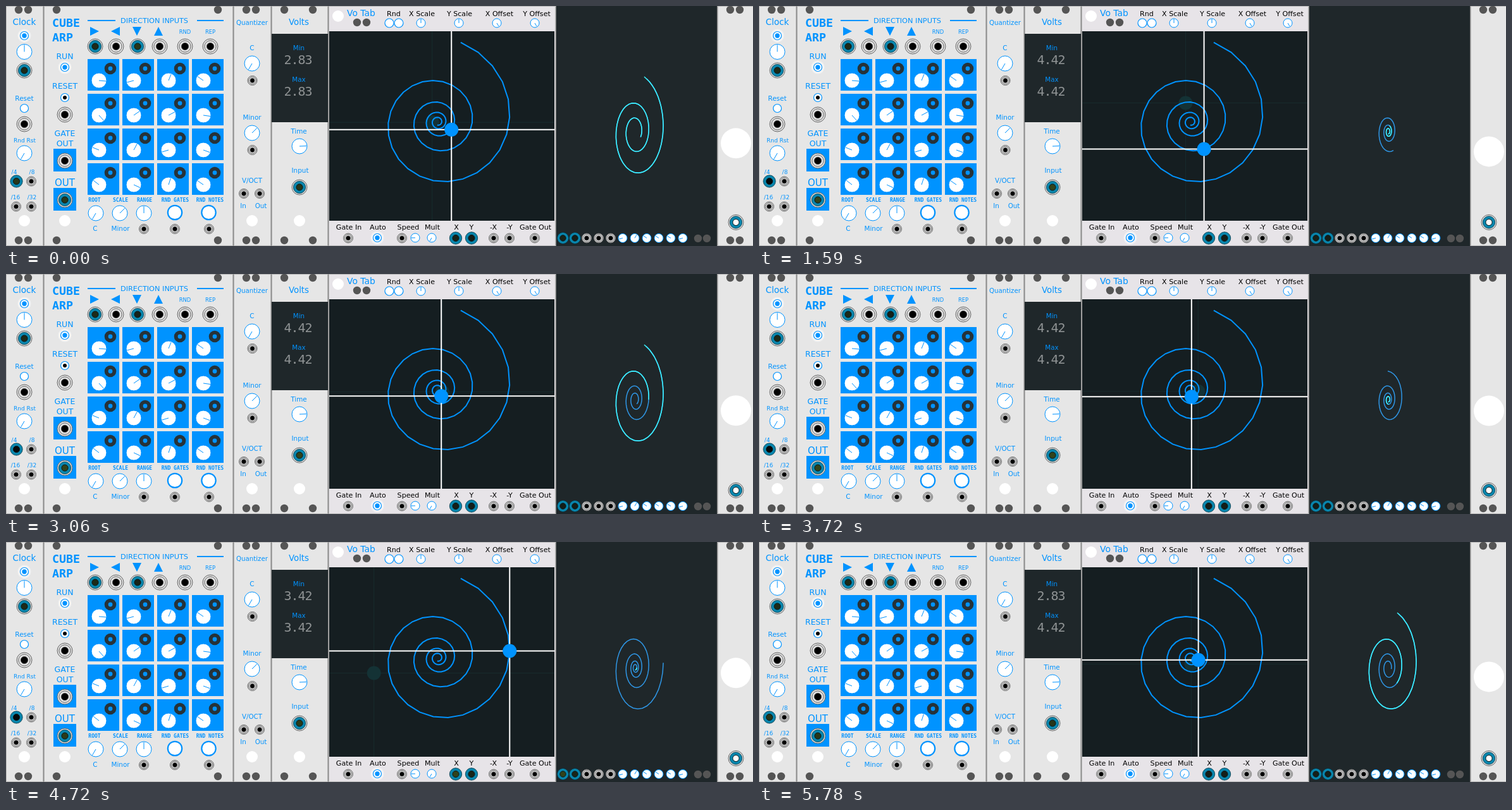
Write an HTML page that moves like this. It is 1181 px wide and 380 px high and loops after 5880 ms.

```html
<!DOCTYPE html>
<html lang="en">
<head>
<meta charset="utf-8">
<title>Modular rack</title>
<style>
html, body { margin: 0; width: 100%; height: 100%; overflow: hidden; background: #e6e6e6; }
svg { display: block; width: 1181px; height: 380px; }
text { font-family: "DejaVu Sans", sans-serif; }
.mono { font-family: "DejaVu Sans Mono", monospace; }
.bold { font-weight: bold; }
</style>
</head>
<body>
<svg id="rack" viewBox="0 0 1181 380"></svg>
<script>
const BLUE = '#0093ff', TEAL = '#0986ad', DARK = '#1f272a', PAPER = '#e6e6e6';
const LOOP = 5880;
const out = [];

// ---------- drawing helpers ----------
const circle = (x, y, r, fill, extra = '') =>
  out.push(`<circle cx="${x}" cy="${y}" r="${r}" fill="${fill}" ${extra}/>`);
const rect = (x, y, w, h, fill, extra = '') =>
  out.push(`<rect x="${x}" y="${y}" width="${w}" height="${h}" fill="${fill}" ${extra}/>`);
const line = (x1, y1, x2, y2, color, w = 1, id = '') =>
  out.push(`<line id="${id}" x1="${x1}" y1="${y1}" x2="${x2}" y2="${y2}" stroke="${color}" stroke-width="${w}"/>`);
const label = (s, x, y, size, color = BLUE, extra = 'text-anchor="middle"') =>
  out.push(`<text x="${x}" y="${y}" font-size="${size}" fill="${color}" ${extra}>${s}</text>`);
const ringed = (w, color = BLUE) => `stroke="${color}" stroke-width="${w}"`;

function knob(x, y, deg, r = 12) {
  const a = deg * Math.PI / 180;
  circle(x, y, r, '#fff', ringed(1));
  line(x, y, x + (r - 1) * Math.cos(a), y + (r - 1) * Math.sin(a), BLUE);
}
function port(x, y, r = 12) {
  circle(x, y, r, '#dedede', ringed(1, '#666'));
  circle(x, y, r * .76, '#e2e2e2', ringed(1, '#666'));
  circle(x, y, r * .47, '#000', ringed(.8, '#444'));
}
function plug(x, y, id, core = '#1b2a1c') {
  circle(x, y, 12, '#dedede', ringed(1, '#666'));
  jack(x, y, id, 9.7, core);
}
function jack(x, y, id, r = 9.7, core = '#1b2a1c') {
  circle(x, y, r, TEAL, ringed(.8, '#0a3442'));
  circle(x, y, r * .52, core, `id="${id}" ${ringed(1, '#0c1518')}`);
}
function button(x, y, r = 6.5, w = 1.2) { circle(x, y, r, '#fff', ringed(w)); }
function led(x, y) {
  circle(x, y, 10.5, '#fff', 'opacity=".5"');
  button(x, y);
  circle(x, y, 3.7, BLUE);
}
const screws = (...pts) => pts.forEach(([x, y]) => circle(x, y, 6.2, '#555'));
const corners = (a, b) => screws([a, 6], [b, 6], [a, 371], [b, 371]);
const badge = (x, y) => circle(x, y, 9, '#fff');
function panel(x, w, fill = PAPER, edge = '#b4b4b4') {
  rect(x + .5, .5, w - 1, 379, fill, ringed(1, edge));
}

// ---------- panels ----------
panel(0, 59); panel(60, 299); panel(360, 59); panel(420, 89);
panel(510, 359, '#e7e4e8'); panel(870, 254, DARK, DARK); panel(1125, 57);
[59.5, 359.5, 419.5, 509.5, 869.5, 1124.5].forEach(x => line(x, 0, x, 380, '#8c8c8c'));

// clock
corners(20, 35);
label('Clock', 29, 30, 13.6);
led(29, 47);
knob(29, 72.5, -90);
plug(29, 102, 'clock');
label('Reset', 29, 150, 10.5);
button(29, 162);
port(29, 187);
label('Rnd Rst', 29.5, 216, 9);
knob(29, 233, 120);
label('/4', 13, 266, 9); label('/8', 41, 266, 9);
label('/16', 15, 306, 9); label('/32', 41, 306, 9);
jack(16.5, 277.5, 'quarter');
port(40, 277.5, 7.5); port(16, 317.5, 7.5); port(40, 317.5, 7.5);
badge(29, 340);

// sequencer
corners(80, 335);
label('CUBE', 73, 33, 18.3, BLUE, 'class="mono bold"');
label('ARP', 73, 56, 18.3, BLUE, 'class="mono bold"');
label('RUN', 93, 84, 12.5); led(93, 97);
label('RESET', 93, 131, 12.5); button(93, 145); circle(93, 145, 3, '#000');
port(93, 172);
label('GATE', 93, 206, 12.5); label('OUT', 93, 222, 12.5);
rect(75, 226, 36, 36, BLUE); port(93, 245);
label('OUT', 93, 285, 15);
rect(75, 288, 36, 36, BLUE); plug(93, 307, 'note');
label('DIRECTION INPUTS', 234.5, 27, 11.3);
line(129, 23, 173, 23, BLUE, 2); line(302, 23, 344, 23, BLUE, 2);
out.push(`<path fill="${BLUE}" d="M133 33L147 40L133 47ZM180 33L166 40L180 47ZM200 33H214L207 47ZM234 47H248L241 33Z"/>`);
label('RND', 283, 44, 8.4); label('REP', 323, 44, 8.4);
plug(141, 64, 'right'); port(174, 64); plug(208, 64, 'down');
port(243, 64); port(283, 64); port(323, 64);
const turns = [5, 165, -68, 215, 48, -35, -28, 8, 202, -62, 163, 20, 218, 25, -72, 215];
turns.forEach((deg, i) => {
  const x = 129 + 55 * (i % 4), y = 84 + 55 * (i >> 2);
  rect(x, y, 50, 50, BLUE);
  knob(x + 18, y + 34, deg);
  circle(x + 36, y + 15, 9.3, '#263238');
  circle(x + 36, y + 15, 3.4, BLUE, `id="cell${i}"`);
});
[['ROOT', 140], ['SCALE', 181], ['RANGE', 219], ['RND GATES', 267.5], ['RND NOTES', 322.5]]
  .forEach(([s, x]) => label(s, x, 310, 8, BLUE, 'class="mono bold" text-anchor="middle"'));
knob(142, 328, 120); knob(180, 328, -45); knob(218, 328, -90);
button(267, 327, 11.2, 2.2); button(320.5, 327, 11.2, 2.2);
label('C', 141, 356, 10.4); label('Minor', 181, 356, 10.4);
[218, 267, 321].forEach(x => port(x, 353, 7.5));
badge(93, 340);

// quantizer
corners(380, 395);
label('Quantizer', 389, 30, 10.2);
label('C', 389, 70, 10.4); knob(389, 91, 120); port(389.5, 118, 7.5);
label('Minor', 389, 180, 10.4); knob(389, 201, -45); port(389.5, 228, 7.5);
label('V/OCT', 389, 280, 10.3);
port(376, 297, 7.5); port(401, 297, 7.5);
label('In', 375, 320, 10.3); label('Out', 403, 320, 10.3);
badge(389, 340);

// volt meter
corners(440, 485);
label('Volts', 463, 30, 13.3);
rect(420, 44, 89, 140, DARK);
label('Min', 463, 70, 10.3); label('Max', 463, 120, 10.3);
const digits = id => `id="${id}" class="mono" letter-spacing="-1"`;
label('', 439.5, 92, 20, '#8f9394', digits('min'));
label('', 439.5, 142, 20, '#8f9394', digits('max'));
label('Time', 463, 202, 10.4); knob(464, 222, -2);
label('Input', 465, 264, 10.4); plug(464, 287, 'meter');
badge(464, 340);

// pad
badge(525, 16);
label('Vo Tab', 539, 16, 13.9, BLUE, '');
screws([555, 26], [570, 26]);
[['Rnd', 613], ['X Scale', 657.5], ['Y Scale', 717], ['X Offset', 780], ['Y Offset', 839]]
  .forEach(([s, x]) => label(s, x, 16, 11.1, '#000'));
button(606, 27, 7); button(621, 27, 7);
knob(656, 27, -90, 7); knob(716, 27, -90, 7); knob(776, 27, 60, 7); knob(836, 27, 60, 7);
rect(511, 40, 356, 300, '#151e21');
[['Gate In', 542], ['Auto', 588], ['Speed', 636], ['Mult', 674], ['X', 712], ['Y', 736],
 ['-X', 770.5], ['-Y', 796], ['Gate Out', 837]].forEach(([s, x]) => label(s, x, 354, 11.1, '#000'));
[541, 626, 771, 796, 836].forEach(x => port(x, 367.5, 7.5));
led(587, 367);
knob(647, 367, 180, 7); knob(673, 367, 120, 7);
jack(711, 367.5, 'px'); jack(736, 367.5, 'py');

// scope
jack(880.5, 367.5, 'sx', 9); jack(899.5, 367.5, 'sy', 9);
[918, 937, 956].forEach(x => port(x, 367.5, 7.5));
[165, -60, -145, -145, -150, 165].forEach((deg, i) => knob(975 + 19 * i, 367.5, deg, 7));
screws([1094, 368], [1108, 368]);

// bouncer
corners(1145, 1160);
plug(1154, 342.5, 'exit', '#fff');
circle(1154, 0, 24, '#fff', 'id="bouncer"');

// ---------- spiral ----------
const TURNS = 4.485;   // from the outer tip to the middle
const MEMORY = 4.58;   // length of the scope trail, in turns
const SIDES = 115;
const MID = { x: 689, y: 190 };
const HUB = { x: 682.8, y: 183.6 };

function spiral(p) {
  const r = 131 * Math.pow(.482, p), a = (p * 360 - 74) * Math.PI / 180;
  return { x: HUB.x + r * Math.cos(a), y: HUB.y + r * Math.sin(a) };
}
// back and forth between tip and middle
function fold(s) {
  const m = s % (2 * TURNS);
  return Math.abs(m) < TURNS ? Math.abs(m) : 2 * TURNS - Math.abs(m);
}
const toScope = ({ x, y }) => ({ x: 995 + .389 * (x - HUB.x), y: 199 + .691 * (y - HUB.y) });
const join = pts => pts.map(p => p.x.toFixed(2) + ' ' + p.y.toFixed(2)).join('L');

const spots = Array.from({ length: SIDES + 1 }, (_, i) => spiral(i / SIDES * TURNS));
line(511, 0, 867, 0, '#182c2e', 1, 'ghostH');
line(0, 40, 0, 340, '#182c2e', 1, 'ghostV');
circle(0, 0, 11, '#143235', 'id="ghost"');
out.push(`<path d="M${join(spots)}" fill="none" stroke="${BLUE}" stroke-width="2"/>`);
line(511, 0, 867, 0, '#fff', 2, 'crossH');
line(0, 40, 0, 340, '#fff', 2, 'crossV');
circle(0, 0, 11, BLUE, 'id="ball"');
[['trail', '#2f97e6'], ['glow', '#3df6ff']].forEach(([id, color]) =>
  out.push(`<path id="${id}" fill="none" stroke="${color}" stroke-width="1.5"/>`));

document.getElementById('rack').innerHTML = out.join('');
const $ = id => document.getElementById(id);
const set = (id, attrs) => { for (const k in attrs) $(id).setAttribute(k, attrs[k]); };

// ---------- timing ----------
// [start, equal steps until the next start]
const pace = [[0, 1], [60, 5], [610, 1], [730, 3], [1070, 1], [1190, 1], [1270, 1], [1390, 5], [1890, 1],
  [2000, 1], [2120, 1], [2240, 3], [2530, 1], [2650, 4], [3060, 1], [3150, 1], [3240, 5], [3720, 1],
  [3810, 1], [3900, 5], [4450, 1], [4540, 2], [4720, 1], [4840, 2], [5040, 1], [5130, 5], [5660, 1], [5780, 1]];
const ticks = pace.flatMap(([t, n], i) => {
  const end = i + 1 < pace.length ? pace[i + 1][0] : LOOP;
  return Array.from({ length: n }, (_, k) => Math.round((t + (end - t) * k / n) / 10) * 10);
});
// [time, turns travelled]
const travel = [[0, 2.288], [1070, 5.885], [2120, 9.32], [3060, 12.345], [3720, 14.5],
  [4720, 17.75], [5780, 21.187], [LOOP, 21.51]];
function travelled(t) {
  const i = travel.findIndex(([end]) => end > t);
  const [t0, a] = travel[i - 1], [t1, b] = travel[i];
  return a + (b - a) * (t - t0) / (t1 - t0);
}
const BEAT = 361.5;
const notes = [2.83, 3.42, 4.42, 4.42, 4.42, 4, 3.42, 4, 4.42, 4, 4.42, 3.83, 3.42, 3.42, 4, 4.42];

// ---------- animation ----------
const shade = v => {
  const k = Math.max(0, Math.min(1, v));
  return `rgb(${20 + 96 * k | 0},${30 + 120 * k | 0},${24 + 8 * k | 0})`;
};
const light = (ids, v) => ids.forEach(id => set(id, { fill: shade(v) }));

function trace(from, to) {
  const n = Math.max(2, Math.ceil((to - from) * 32));
  const pts = Array.from({ length: n + 1 }, (_, i) => toScope(spiral(fold(from + (to - from) * i / n))));
  return 'M' + join(pts);
}

function draw(t) {
  const s = travelled(t), { x, y } = spiral(fold(s));
  const gx = 2 * MID.x - x, gy = 2 * MID.y - y;
  set('ball', { cx: x, cy: y });
  set('crossH', { y1: y, y2: y });
  set('crossV', { x1: x, x2: x });
  set('ghost', { cx: gx, cy: gy });
  set('ghostH', { y1: gy, y2: gy });
  set('ghostV', { x1: gx, x2: gx });
  set('bouncer', { cy: 208 + .427 * (y - 174) });

  // stretches passed twice shine brighter
  const turn = TURNS * Math.floor(s / TURNS);
  const bright = [turn, turn - TURNS].map(m => {
    const len = Math.min(s - m, m - s + MEMORY);
    return len > 0 ? trace(m - len, m) : '';
  }).join('');
  set('trail', { d: trace(s - MEMORY, s) });
  set('glow', { d: bright });

  const beat = Math.floor((t + 15) / BEAT), age = t + 15 - beat * BEAT;
  const now = notes[beat % 16], before = notes[(beat + 15) % 16];
  const past = age < 13 ? before : now;
  $('min').textContent = Math.min(now, past).toFixed(2);
  $('max').textContent = Math.max(now, past).toFixed(2);

  const hit = age < 9;
  light(['clock', 'right'], hit ? .9 : .1);
  const fourth = beat % 4 === 0 && age < 20;
  set('quarter', { fill: fourth ? shade(.2) : '#05090a' });
  light(['down'], fourth ? .2 : .04);
  light(['note', 'meter'], now / 14);
  light(['px', 'sx'], (x - MID.x) / 356);
  light(['py', 'sy'], (MID.y - y) / 300);
  const row = (2 + (beat >> 2)) % 4, active = row * 4 + (beat + 1) % 4;
  turns.forEach((_, i) => set('cell' + i, { opacity: hit && i === active ? 0 : 1 }));
}

function tick() {
  const t = performance.now() % LOOP;
  let i = ticks.length - 1;
  while (ticks[i] > t) i--;
  draw(ticks[i]);
  requestAnimationFrame(tick);
}
tick();
</script>
</body>
</html>
```
